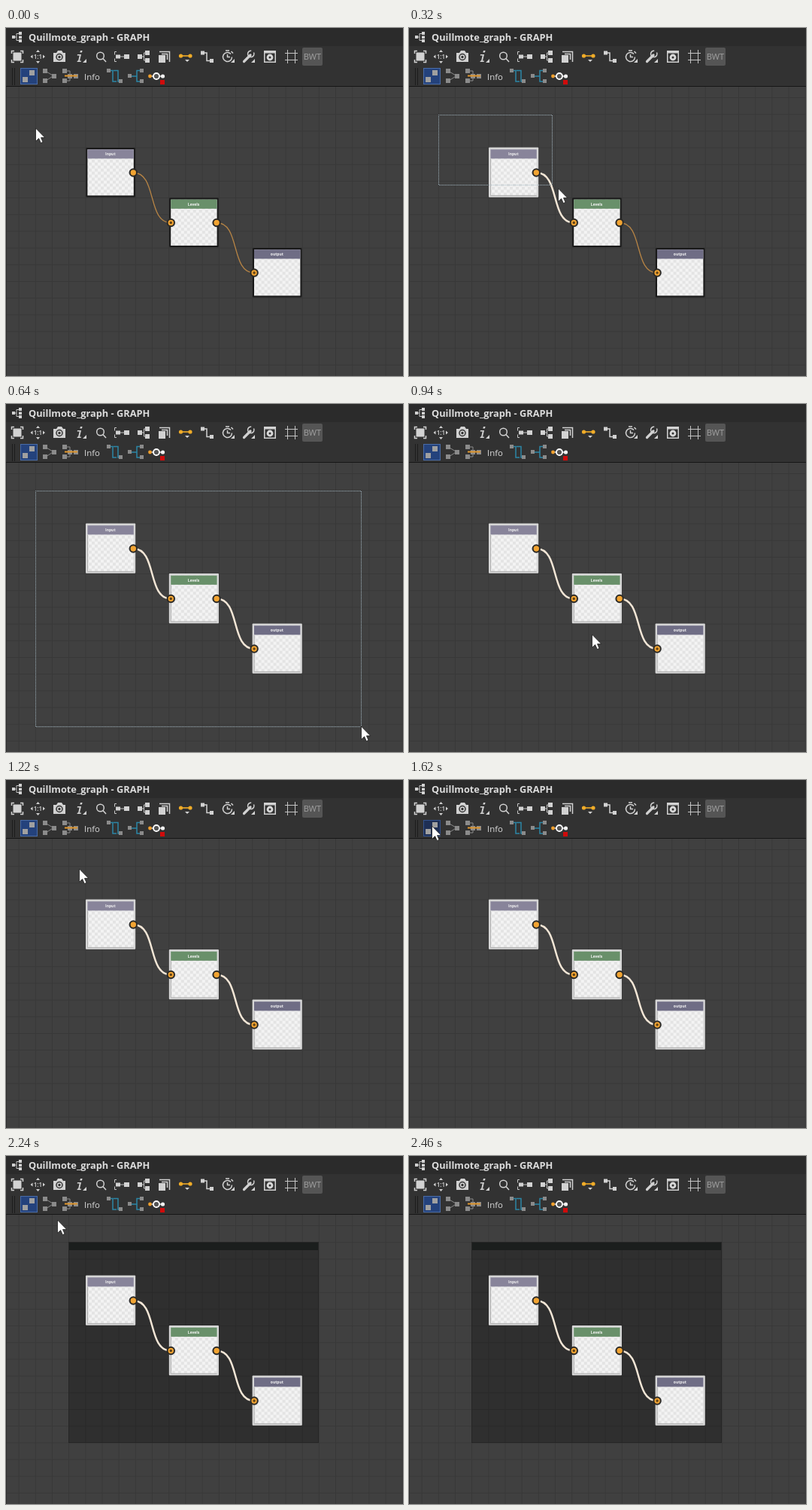
Animation of 528 by 462 pixels, one loop 2600 ms. Source, as an HTML page:

```html
<!DOCTYPE html>
<html lang="en">
<head>
<meta charset="utf-8">
<title>Graph editor</title>
<style>
html, body { margin: 0; width: 100%; height: 100%; overflow: hidden; background: #404040; }
svg { display: block; width: 528px; height: 462px; }
text { font-family: "Open Sans", "Noto Sans", sans-serif; fill: #dcdcdc; }
.label { font-size: 5px; font-weight: 700; fill: #f4f4f4; text-anchor: middle; }
.crisp { shape-rendering: crispEdges; }
.line { fill: none; stroke: #d2d2d2; stroke-width: 1.5; }
.thin { fill: none; stroke: #c4c4c4; stroke-width: 1; }
.wire { fill: none; stroke: #8b8b8b; stroke-width: 1; }
.teal { fill: none; stroke: #2c86a6; stroke-width: 1.5; }
.gray { fill: #8b8b8b; }
.lite { fill: #d2d2d2; }
.grip { fill: none; stroke: #1d1d1d; }
</style>
</head>
<body>
<svg viewBox="0 0 528 462" xmlns="http://www.w3.org/2000/svg">
  <defs>
    <pattern id="grid" x="16.6" y="92" width="22.18" height="22.18" patternUnits="userSpaceOnUse">
      <path d="M.5 0V22.18M0 .5H22.18" stroke="#383838" stroke-width="1"/>
    </pattern>
    <pattern id="check" width="8" height="8" patternUnits="userSpaceOnUse">
      <rect width="8" height="8" fill="#f3f3f3"/>
      <path d="M0 0h4v4H0zM4 4h4v4H4z" fill="#e4e4e4"/>
    </pattern>
  </defs>
  <rect width="528" height="462" fill="#404040"/>
  <rect y="78" width="528" height="384" fill="url(#grid)"/>
  <g id="group" class="crisp">
    <rect x="83" y="114" width="333" height="267" fill="#000" fill-opacity=".27"/>
    <rect x="83" y="114" width="333" height="11" fill="#1b1e1d"/>
    <rect x="83.5" y="114.5" width="332" height="266" fill="none" stroke="#262626"/>
  </g>
  <g id="wires" fill="none"></g>
  <g id="nodes"></g>
  <g id="ports"></g>
  <rect id="band" fill="none" stroke="#a3b6c0" stroke-dasharray="1 1" stroke-dashoffset=".5"/>
  <g id="bars"></g>
  <path id="cursor" d="M-.5 -1V16.4L3.6 12.6 6.3 18.6 9.1 17.4 6.5 11.6H11.8Z" fill="#fff" stroke="#1c1c1c" stroke-width=".8"/>
</svg>
<script>
const $ = id => document.getElementById(id);
const LOOP = 2600, STEP = 20;
const PRESS = 80, RELEASE = 740, GROUPED = 1860;
const START = [39, 115];

// Pointer tip: time, x, y
const track = [
  [0, 40, 134], [60, 39, 115], [120, 39, 115], [320, 199, 214], [540, 442, 397],
  [640, 473, 429], [700, 477, 434], [740, 476, 433], [940, 244, 307], [1080, 161, 176],
  [1260, 84, 108], [1440, 42, 74], [1620, 31, 62], [2020, 30, 64], [2140, 30, 64],
  [2240, 69, 86], [2340, 260, 150], [2440, 514, 224], [2460, 545, 232], [2600, 545, 232]
];

const SIZE = 66, GAP_X = 110.8, GAP_Y = 66.5;
const nodes = [["Input", "#88849a"], ["Levels", "#69906a"], ["output", "#6f6d85"]]
  .map(([name, color], i) => ({ name, color, x: 106 + GAP_X * i, y: 158.6 + GAP_Y * i }));

const rect = (x, y, w, h, fill, more = "") =>
  `<rect x="${x}" y="${y}" width="${w}" height="${h}" fill="${fill}" ${more}/>`;
const path = (d, cls) => `<path d="${d}" class="${cls}"/>`;
const dot = (x, y, r, fill, more = "") => `<circle cx="${x}" cy="${y}" r="${r}" fill="${fill}" ${more}/>`;
const squares = (size, ...at) =>
  path(at.map(([x, y]) => `M${x} ${y}h${size}v${size}h${-size}z`).join(""), "gray crisp");
const corner = (x, y) => path(`M${x} ${y}h5v-5z`, "lite");

function drawBars() {
  const brackets = "M7.5 34V30.5H11M19 30.5H22.5V34M22.5 42V45.5H19M11 45.5H7.5V42";
  $("bars").innerHTML = [
    rect(0, 0, 528, 24, "#2b2b2b"),
    rect(0, 24, 528, 53, "#323232"),
    rect(0, 77, 528, 1, "#161616"),
    rect(0, 78, 1, 384, "#2d2d2d"),
    // title
    path("M10 12H14M14 7.5V16.5M14 7.5H18M14 16.5H18", "thin"),
    path("M8 10h4v4h-4zM17 5h4v4h-4zM17 10.5h4v3.5h-4zM17 15h4v4h-4z", "lite"),
    `<text x="30" y="17" font-size="12.8" font-weight="700">Quillmote_graph - GRAPH</text>`,
    // first row
    path(brackets, "line"), rect(9.5, 32.5, 11, 11, "#d2d2d2"),
    path("M42.5 29l2.5 3h-5zM42.5 47l2.5-3h-5zM32.5 38l3-2.5v5zM52 38l-3-2.5v5z", "lite"),
    `<text x="42.3" y="41" font-size="8" font-weight="600" text-anchor="middle">1:1</text>`,
    path("M63 33h4l2-3h5l2 3h3v12H63z", "lite"),
    dot(71, 38.5, 4, "#d2d2d2", 'stroke="#323232" stroke-width="1.5"'), dot(71, 38.5, 1.7, "#323232"),
    path("M99 30h2.6l-.7 2.6h-2.6zM95 35h5l-2 8.5h2l-.4 1.5H94.5l.4-1.5h1.2l1.6-7h-3z", "lite"), corner(102, 46),
    `<circle cx="125.5" cy="37" r="4.8" class="line"/>`, path("M129 40.5L133 45", "line"),
    path("M147 31.5h-2.5v4M147 44.5h-2.5v-4M150 38h8", "thin"), path("M146 35.5h6v5h-6zM157 35h7v6h-7z", "lite"),
    path("M178 38H184M183.5 33V43M183.5 33H187M183.5 43H187", "thin"),
    path("M175 35h6v6h-6zM185 30h6v6h-6zM185 40h6v6h-6z", "lite"),
    path("M204 31.5H217.5V45M207 34.5H214.5V42", "line"), path("M203 36h9v10h-9z", "lite"),
    `<path d="M232 37H246" stroke="#f0ac28" stroke-width="1.6"/>`,
    dot(232.5, 37, 2.6, "#f0ac28"), dot(245, 37, 2.6, "#f0ac28"), path("M238 42h6l-3 3z", "lite"),
    path("M262 33H267V43.5H273", "line"), path("M259 30.5h5v5h-5zM271 41h5v5h-5z", "lite"),
    path("M299 34.5A6 6 0 1 0 300.5 38.5M292 30H297M294.5 35V38.5H298M299.5 31L302 33.5", "line"), corner(299, 46),
    `<path d="M316.5 44.5L325 36" stroke="#d2d2d2" stroke-width="3.2" stroke-linecap="round"/>`,
    path("M329.5 32.5a4.2 4.2 0 1 1-3.3-2.3", "line"), corner(326, 46),
    path("M343 30h16v16h-16z", "lite"), rect(344.5, 33.5, 13, 11, "#323232"),
    dot(351, 39, 4.4, "#d8d8d8"), dot(351, 39, 1.5, "#323232"),
    path("M374.5 29V47M384.5 29V47M371 33.5H388M371 42.5H388", "thin crisp"),
    rect(394, 26, 27, 24, "#555", 'rx="2"'),
    `<text x="407.5" y="42" font-size="11" text-anchor="middle" style="fill:#a2a2a2">BWT</text>`,
    // second row
    path("M8.5 53V76M11.5 53V76", "grip crisp"),
    `<rect id="button" x="19.5" y="53.5" width="22" height="21" class="crisp"/>`,
    rect(31, 56, 7, 7, "#a0a0a0"), rect(22, 65, 7, 7, "#a0a0a0"),
    path("M53 57.5L63 63.5L53 70", "wire"),
    squares(6, [49, 54], [49, 67], [61, 61]),
    path("M78 57H85V70H78", "wire"),
    squares(6, [75, 54], [75, 67], [90, 61], [82, 61]),
    `<path d="M78 63.5H95" stroke="#e0962c" stroke-width="2"/>`,
    `<text x="104" y="69" font-size="11.4">Info</text>`,
    path("M138 56.5H142V71H147M143 56.5H149V71H152", "teal"), squares(5, [134, 54], [150, 68]),
    path("M181 56.5H174V71H181M166 64H174", "teal"), squares(5, [162, 61], [178, 54], [178, 68]),
    path("M191 64H209", "line"),
    dot(191.5, 64, 2.4, "#ef9f2c"), dot(200, 64, 4, "#555", 'stroke="#fff" stroke-width="1.8"'),
    dot(208.5, 64, 2.6, "#f2f2f2"), rect(205, 69, 6, 6, "#cf0b0b", 'class="crisp"')
  ].join("");
}

function drawGraph() {
  $("nodes").innerHTML = nodes.map(({ name, x, y, color }) =>
    `<g transform="translate(${x} ${y})">` +
    `<rect rx="1"/>` +
    rect(2.4, 2.6, 61.4, 61.2, "url(#check)") +
    rect(2.4, 2.6, 61.4, 12.2, color) +
    `<path d="M2.6 15V63.8H63.6" fill="none" stroke="#9c9c9c" stroke-width=".7"/>` +
    `<text x="32.8" y="10.9" class="label">${name}</text></g>`).join("");

  const port = (x, y, inlet) => dot(x, y, 4.7, "#f2a432", 'stroke="#2a2927" stroke-width="2"') +
    (inlet ? dot(x, y, 1.7, "#5f4218") : "");
  const links = nodes.slice(1).map((n, i) =>
    [nodes[i].x + 63.3, nodes[i].y + 33.4, n.x + 2.5, n.y + 33.4]);
  $("wires").innerHTML = links.map(([a, b, c, d]) =>
    `<path d="M${a} ${b}C${a + 32} ${b} ${c - 32} ${d} ${c} ${d}"/>`).join("");
  $("ports").innerHTML = links.map(([a, b, c, d]) => port(a, b) + port(c, d, true)).join("");
}

// Monotone cubic through the track, one axis at a time
function slope(i, k) {
  if (i < 1 || i > track.length - 2) return 0;
  const [a, b, c] = [track[i - 1], track[i], track[i + 1]];
  const p = (b[k] - a[k]) / (b[0] - a[0]), q = (c[k] - b[k]) / (c[0] - b[0]);
  return p * q <= 0 ? 0 : 2 * p * q / (p + q);
}

function pointer(t) {
  t = Math.max(0, t);
  let i = 0;
  while (i < track.length - 2 && track[i + 1][0] <= t) i++;
  const a = track[i], b = track[i + 1], h = b[0] - a[0], u = (t - a[0]) / h, v = 1 - u;
  return [1, 2].map(k =>
    v * v * (1 + 2 * u) * a[k] + u * u * (3 - 2 * u) * b[k] +
    h * u * v * (v * slope(i, k) - u * slope(i + 1, k)));
}

function set(el, attrs) {
  for (const k in attrs) el.setAttribute(k, attrs[k]);
}

function render(t) {
  const [x, y] = pointer(t).map(Math.round);
  set($("cursor"), { transform: `translate(${x} ${y})` });

  // The band trails the pointer slightly
  const dragging = t >= PRESS && t < RELEASE;
  const [ex, ey] = pointer(Math.min(t, RELEASE) - 9).map(Math.round);
  const w = Math.max(0, ex - START[0]), h = Math.max(0, ey - START[1]);
  set($("band"), {
    x: START[0] + .5, y: START[1] + .5, width: w, height: h,
    visibility: dragging && w && h ? "visible" : "hidden"
  });

  const picked = nodes.map(n => t >= RELEASE || (dragging && ex > n.x && ey > n.y));
  picked.forEach((on, i) => {
    const g = $("nodes").children[i], inset = on ? 0 : .4, size = SIZE - 2 * inset + .2;
    set(g.firstChild, { x: inset, y: inset, width: size, height: size, fill: on ? "#d6d6d6" : "#191919" });
    set(g.querySelector("path"), { visibility: on ? "visible" : "hidden" });
  });
  [...$("wires").children].forEach((wire, i) => {
    const on = picked[i] || picked[i + 1];
    set(wire, { stroke: on ? "#f3e6d6" : "#b58345", "stroke-width": on ? 2.5 : 1.3 });
  });

  set($("group"), { visibility: t >= GROUPED ? "visible" : "hidden" });
  const hover = x > 19 && x < 42 && y > 53 && y < 75;
  set($("button"), { fill: hover ? "#1e2f55" : "#24427c", stroke: hover ? "#34538c" : "#4a6ca6" });
}

drawBars();
drawGraph();
const begin = performance.now();
function tick() {
  const t = (performance.now() - begin) % LOOP;
  render(Math.floor(t / STEP) * STEP);
  requestAnimationFrame(tick);
}
tick();
</script>
</body>
</html>
```
